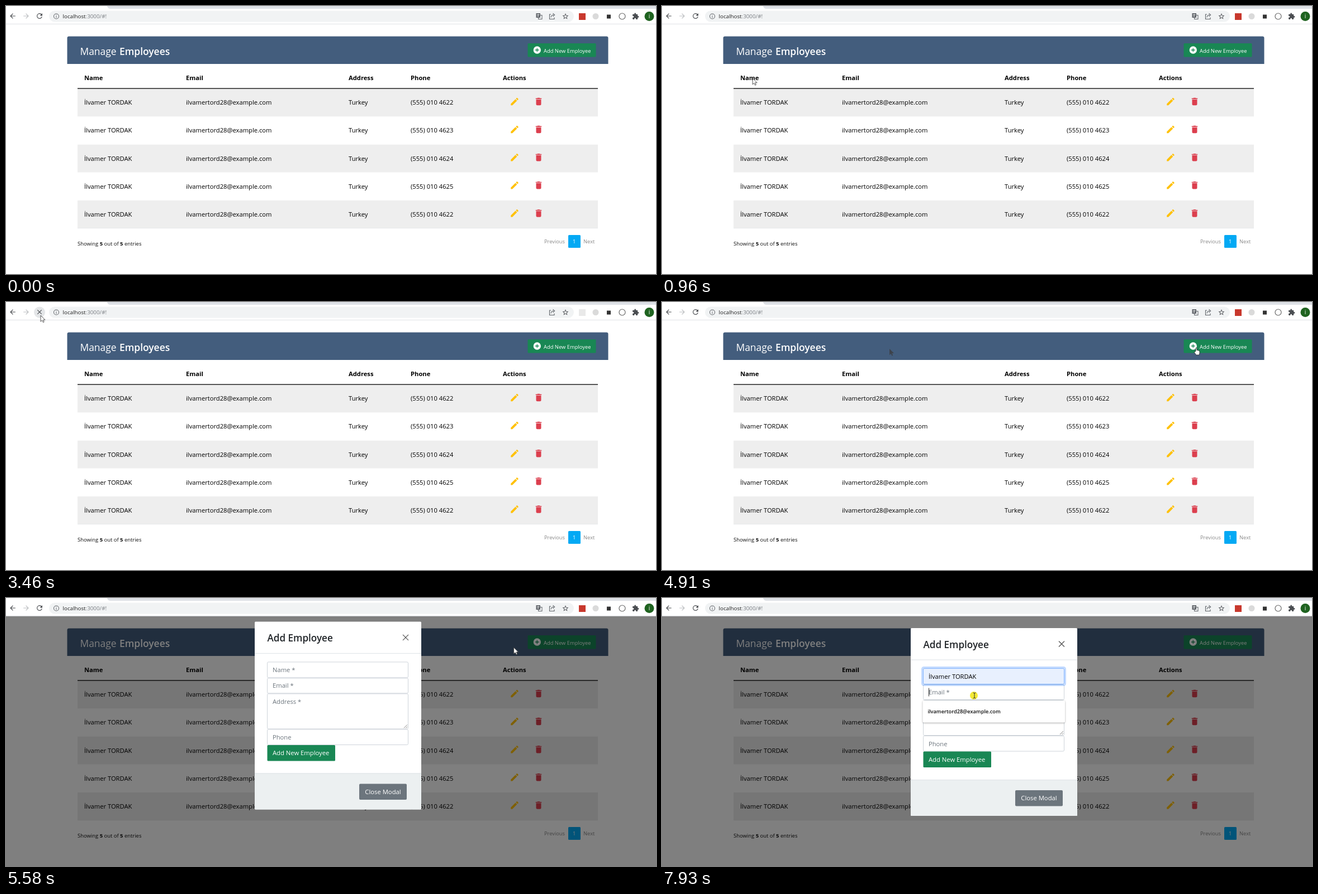
These frames come from a looping animation (1163 by 481 pixels, 8 s). An HTML page:

```html
<!DOCTYPE html>
<html lang="en">
<head>
<meta charset="utf-8">
<title>Manage Employees</title>
<style>
html, body { margin: 0; width: 100%; height: 100%; overflow: hidden; background: #fff; }
svg { display: block; width: 1163px; height: 481px; font-family: "Open Sans", "Noto Sans", sans-serif; }
.popup { filter: drop-shadow(0 1px 1.5px #0005); }
</style>
</head>
<body>
<svg id="stage" viewBox="0 0 1163 481"></svg>
<script>
const LOOP = 8000;
const GREEN = '#198754', GREY = '#5f6368', MUTED = '#6c757d';
const NAME = 'İlvamer TORDAK', EMAIL = 'ilvamertord28@example.com';

const ICONS = {
  edit: 'M3 17.25V21h3.75L17.81 9.94l-3.75-3.75zM20.71 7.04a1 1 0 0 0 0-1.41l-2.34-2.34a1 1 0 0 0-1.41 0l-1.83 1.83 3.75 3.75z',
  trash: 'M6 18c0 1.8 1 3 3 3h6c2 0 3-1.2 3-3V7H6zM19 4h-3.5l-1-1h-5l-1 1H5v2h14z',
  add: 'M12 2a10 10 0 1 0 0 20 10 10 0 0 0 0-20zm5 11h-4v4h-2v-4H7v-2h4V7h2v4h4z',
  back: 'M20 11H7.83l5.59-5.59L12 4l-8 8 8 8 1.41-1.41L7.83 13H20z',
  forward: 'M4 11h12.17l-5.59-5.59L12 4l8 8-8 8-1.41-1.41L16.17 13H4z',
  reload: 'M17.65 6.35A8 8 0 1 0 19.73 14h-2.08A6 6 0 1 1 12 6c1.66 0 3.14.69 4.22 1.78L13 11h7V4z',
  stop: 'M19 6.4L17.6 5 12 10.6 6.4 5 5 6.4 10.6 12 5 17.6 6.4 19 12 13.4 17.6 19 19 17.6 13.4 12z',
  info: 'M11 7h2v2h-2zm0 4h2v6h-2zm1-9a10 10 0 1 0 0 20 10 10 0 0 0 0-20zm0 18a8 8 0 1 1 0-16 8 8 0 0 1 0 16z',
  star: 'M22 9.24l-7.19-.62L12 2 9.19 8.63 2 9.24l5.46 4.73L5.82 21 12 17.27 18.18 21l-1.63-7.03zM12 15.4l-3.76 2.27 1-4.28-3.32-2.88 4.38-.38L12 6.1l1.71 4.04 4.38.38-3.32 2.88 1 4.28z',
  puzzle: 'M20.5 11H19V7c0-1.1-.9-2-2-2h-4V3.5a2.5 2.5 0 0 0-5 0V5H4c-1.1 0-2 .9-2 2v3.8h1.5a2.7 2.7 0 0 1 0 5.4H2V20c0 1.1.9 2 2 2h3.8v-1.5a2.7 2.7 0 0 1 5.4 0V22H17c1.1 0 2-.9 2-2v-4h1.5a2.5 2.5 0 0 0 0-5z'
};
const ARROW = 'M0 0V11.2L2.6 8.8 4.4 12.6 6.2 11.8 4.5 8.1H8z';

const text = (x, y, s, size = 11.2, fill = '#000', weight = 400, anchor = 'start') =>
  `<text x="${x}" y="${y}" font-size="${size}" fill="${fill}" font-weight="${weight}" text-anchor="${anchor}">${s}</text>`;
const rect = (x, y, w, h, fill, extra = '') =>
  `<rect x="${x}" y="${y}" width="${w}" height="${h}" fill="${fill}" ${extra}/>`;
const circle = (x, y, r, fill, extra = '') => `<circle cx="${x}" cy="${y}" r="${r}" fill="${fill}" ${extra}/>`;
const line = (d, stroke, width = 1, extra = '') =>
  `<path d="${d}" fill="none" stroke="${stroke}" stroke-width="${width}" ${extra}/>`;
const group = (id, body, extra = '') => `<g id="${id}" ${extra}>${body}</g>`;
// Icons are drawn on a 24-unit grid centred on (x, y).
const icon = (name, x, y, size, fill) =>
  `<path d="${ICONS[name]}" fill="${fill}" transform="translate(${x - size / 2} ${y - size / 2}) scale(${size / 24})"/>`;

const rowTop = i => 148.5 + 50.1 * i;

function tableRow(last, i) {
  const y = rowTop(i), base = y + 28.8;
  return rect(128, y, 931, 50, i % 2 ? '#fff' : '#eee', `id="row${i}"`) +
    text(140, base, NAME) + text(322, base, EMAIL) + text(613, base, 'Turkey') +
    text(724, base, `(555) 010 462${last}`) +
    icon('edit', 910, y + 23, 18, '#ffc107') + icon('trash', 953, y + 23, 18, '#dc3f4e');
}

function page() {
  const heads = [[140, 'Name'], [322, 'Email'], [613, 'Address'], [724, 'Phone'], [889, 'Actions']];
  return `<path d="M109.5 104V57.5q0-3 3-3H1074.5q3 0 3 3V104z" fill="#435d7d"/>` +
    text(132.5, 88, 'Manage', 17.4, '#fff') + text(203, 88, 'Employees', 17.4, '#fff', 600) +
    rect(933.5, 67, 122, 24.5, GREEN, 'rx="1.5"') + icon('add', 950.3, 79, 16, '#fff') +
    text(962, 83.8, 'Add New Employee', 9.4, '#fff') +
    heads.map(([x, s]) => text(x, 133, s, 11.2, '#000', 700)).join('') +
    [2, 3, 4, 5, 2].map(tableRow).join('') +
    rect(128, 147.3, 931, 1.4, '#111') + rect(128, 398.6, 931, .6, '#dee2e6') +
    text(128, 430, 'Showing <tspan font-weight="700">5</tspan> out of <tspan font-weight="700">5</tspan> entries', 9.45, '#111') +
    text(963, 426.4, 'Previous', 9.3, '#8a8a8a') + rect(1006, 411, 22, 23, '#03a9f4', 'rx="1.5"') +
    text(1016.7, 426.4, '1', 9.4, '#fff', 400, 'middle') + text(1033, 426.4, 'Next', 9.4, '#8a8a8a');
}

function chrome() {
  const translate = rect(952.5, 16.5, 6.5, 7, '#f1f3f4', `stroke="${GREY}"`) + rect(948.5, 13, 7.5, 8, GREY) +
    line('M950 15.5h4.5M952.2 14.3v1.2M953.7 15.5l-3.2 4M950.7 16.5l3 3', '#f1f3f4', .8);
  return rect(0, 0, 1163, 32, '#fff') + '<path d="M181 0H1163V5H187q-5 0-6-5z" fill="#dee1e6"/>' +
    rect(0, 31.8, 1163, 1, '#dfe1e5') + circle(60, 18.5, 10, '#e4e6e8', 'id="reloadHover"') +
    icon('back', 12, 18, 14.5, '#4a4d51') + icon('forward', 36, 18, 14.5, '#bcbec1') +
    group('reload', icon('reload', 60, 18, 15, '#4a4d51')) + group('stop', icon('stop', 60, 18, 14, '#4a4d51')) +
    rect(77, 8.5, 939, 20, '#f1f3f4', 'rx="10"') + icon('info', 90, 18.5, 12, GREY) +
    text(101.5, 22, 'localhost<tspan fill="#777b80">:3000/#!</tspan>', 9.8, '#222') +
    group('translate', translate) +
    line('M975 15H972.5V23.5H981V20.5M975 20.5q.5-4.5 5-4.5M978.5 13.2l3.2 2.8-3.2 2.8', GREY, 1.1) +
    icon('star', 1001, 18.5, 13, '#4a4d51') +
    rect(1025, 13, 12, 12, '#c8382d', 'id="badge"') + circle(1055, 18.5, 5.5, '#dadada') +
    rect(1075, 15.5, 7, 7, '#333') + circle(1102.5, 18.5, 5.5, 'none', 'stroke="#666" stroke-width="1.2"') +
    icon('puzzle', 1126.5, 18.5, 13, '#4a4d51') +
    circle(1151, 18.5, 8.5, '#1f6320') + text(1151, 22, 'i', 10, '#fff', 400, 'middle');
}

function modal() {
  const field = (y, h, id) => rect(467.5, y + .5, 252, h - 1, '#fff', `id="${id}" rx="2" stroke="#ced4da"`);
  const hint = (y, s, id) => group(id, text(477, y, s, 11.2, MUTED));
  const caret = (y, id) => group(id, line(`M477.5 ${y}v15`, '#333'));
  const form = rect(445, 54, 298, 337, '#fff', 'rx="1.5"') +
    text(467.5, 89.5, 'Add Employee', 17.1, '#212529', 600) +
    line('M710 77.5l10 10M720 77.5l-10 10', '#555', 1.3) + rect(445, 110.5, 298, 1, '#dee2e6') +
    field(126, 29, 'nameBox') + field(155, 28, 'emailBox') + field(183, 64, 'addressBox') + field(247, 28.5, 'phoneBox') +
    hint(145, 'Name *', 'nameHint') + hint(173, 'Email *', 'emailHint') + hint(201.5, 'Address *', 'addressHint') +
    hint(265.5, 'Phone', 'phoneHint') + group('nameValue', text(477, 145, NAME)) +
    line('M712 245l6-6M715.5 245l2.5-2.5', '#777', .9) +
    rect(467.5, 275.5, 121.5, 28.5, GREEN, 'rx="1.5"') + text(477, 294, 'Add New Employee', 11.25, '#fff') +
    '<path d="M445 326H743V389.5q0 1.5-1.5 1.5H446.5q-1.5 0-1.5-1.5z" fill="#ecf0f1"/>' +
    rect(445, 326, 298, 1, '#dee2e6') +
    rect(632, 345, 85, 28.5, MUTED, 'rx="2"') + text(674.5, 363.3, 'Close Modal', 11.25, '#fff', 400, 'middle');
  const focus = rect(465.5, 124.5, 256, 32, 'none', 'rx="3" stroke="#0d6efd" stroke-opacity=".25" stroke-width="3"') +
    rect(467.5, 126.5, 252, 28, 'none', 'rx="2" stroke="#86b7fe"');
  const names = rect(466.5, 156, 254.5, 67, '#fff', 'rx="2"') + rect(466.5, 162, 254.5, 27, '#eee', 'id="pick"') +
    text(475.5, 178.5, NAME, 9.5, '#111', 600) + text(475.5, 205.5, NAME + '1', 9.5, '#111', 600);
  const emails = rect(466.5, 184, 254.5, 39.5, '#fff', 'rx="2"') + text(475.5, 207.2, EMAIL, 9.2, '#111', 600);
  return group('modal', form + group('focus', focus) + caret(133, 'nameCaret') + caret(161.5, 'emailCaret') +
    group('names', names, 'class="popup"') + group('emails', emails, 'class="popup"'));
}

function cursor() {
  const hand = 'M-1 6V.8Q0-.6 1 .8V4.6q2.6-.3 5 1.6V9Q6 11 5 13H-.5Q-1.8 10.5-3.8 8.2-3.6 6.8-2.2 7.4z';
  return group('cursor', circle(-1, 0, 7, '#f3ea35', 'id="click"') +
    `<path id="arrow" d="${ARROW}" fill="#fff" stroke="#444" stroke-width=".9"/>` +
    `<path id="hand" d="${hand}" fill="#fff" stroke="#222" stroke-width=".8"/>` +
    line('M-2.5-5Q0-5 0-3.5Q0-5 2.5-5M0-4V4M-2.5 5Q0 5 0 3.5Q0 5 2.5 5', '#333', 1, 'id="beam"'));
}

const stage = document.getElementById('stage');
stage.innerHTML = page() +
  `<path id="trail" d="${ARROW}" fill="#3d434c" transform="translate(407 84)"/>` +
  rect(0, 32, 1163, 449, '#000', 'id="backdrop"') + modal() + chrome() + cursor();
const part = {};
for (const node of stage.querySelectorAll('[id]')) part[node.id] = node;

// Pointer path: time, x, y
const PATH = [
  [360, 990, 453], [670, 397, 255], [1090, 58, 74], [1300, 85, 60], [1600, 68, 20], [1990, 68, 20],
  [2400, 66, 32], [2800, 57, 18], [3030, 62, 24], [3770, 62, 24], [3910, 60, 18], [4350, 407, 84],
  [4640, 780, 108], [4780, 922, 98], [4910, 956, 82], [5050, 958, 81], [5510, 958, 81], [6050, 582, 141],
  [6190, 581, 144], [6330, 576, 153], [6600, 576, 153], [6860, 545, 174], [7440, 541, 176], [7800, 559, 175], [LOOP, 559, 175]
];
const clamp = v => Math.min(1, Math.max(0, v));
const progress = (t, start, length) => clamp((t - start) / length);

function pointer(t) {
  const i = Math.max(1, PATH.findIndex(k => k[0] > t));
  const [t0, x0, y0] = PATH[i - 1], [t1, x1, y1] = PATH[i];
  const p = progress(t, t0, t1 - t0);
  return [x0 + (x1 - x0) * p, y0 + (y1 - y0) * p];
}

const show = (id, on) => part[id].setAttribute('visibility', on ? 'inherit' : 'hidden');

function draw(t) {
  const within = (a, b) => t >= a && t < b;
  const [x, y] = pointer(t);
  part.cursor.setAttribute('transform', `translate(${x} ${y})`);
  show('cursor', t >= 360);
  const hand = within(4810, 5440), beam = t >= 6080 && !within(6700, 7440);
  show('hand', hand);
  show('beam', beam);
  show('arrow', !hand && !beam);
  show('click', within(5310, 5440) || within(6330, 6470) || within(7380, 7500) || t >= 7860);
  show('trail', within(4420, 5440));

  for (let i = 0; i < 5; i++) {
    const hover = within(360, 5000) && y >= rowTop(i) && y < rowTop(i + 1) && x > 128 && x < 1059;
    part['row' + i].setAttribute('fill', hover ? '#e1e1e1' : i % 2 ? '#fff' : '#eee');
  }

  const loading = within(1990, 2600) || within(3030, 3640), stop = within(2060, 2500) || within(3100, 3540);
  show('reloadHover', t < 4000 && Math.hypot(x - 60, y - 18) < 13 && t > 1200);
  show('reload', !stop);
  show('stop', stop);
  show('translate', !loading);
  part.badge.setAttribute('fill', loading ? '#e9e9e9' : '#c8382d');

  part.backdrop.setAttribute('opacity', .5 * progress(t, 5430, 150));
  const slide = Math.pow(1 - progress(t, 5435, 300), 1.7);
  part.modal.setAttribute('opacity', progress(t, 5420, 150));
  part.modal.setAttribute('transform', `translate(0 ${-36 * slide})`);

  const filled = t >= 6870;
  show('focus', t >= 6400);
  show('names', within(6400, 7440));
  show('pick', within(6870, 7440));
  show('nameCaret', within(6400, 6870));
  show('nameHint', !filled);
  show('nameValue', filled);
  part.nameBox.setAttribute('fill', filled ? '#e8f0fe' : '#fff');
  show('emails', t >= 7870);
  show('emailCaret', t >= 7870);
}

function tick() {
  draw(performance.now() % LOOP);
  requestAnimationFrame(tick);
}
tick();
</script>
</body>
</html>
```
